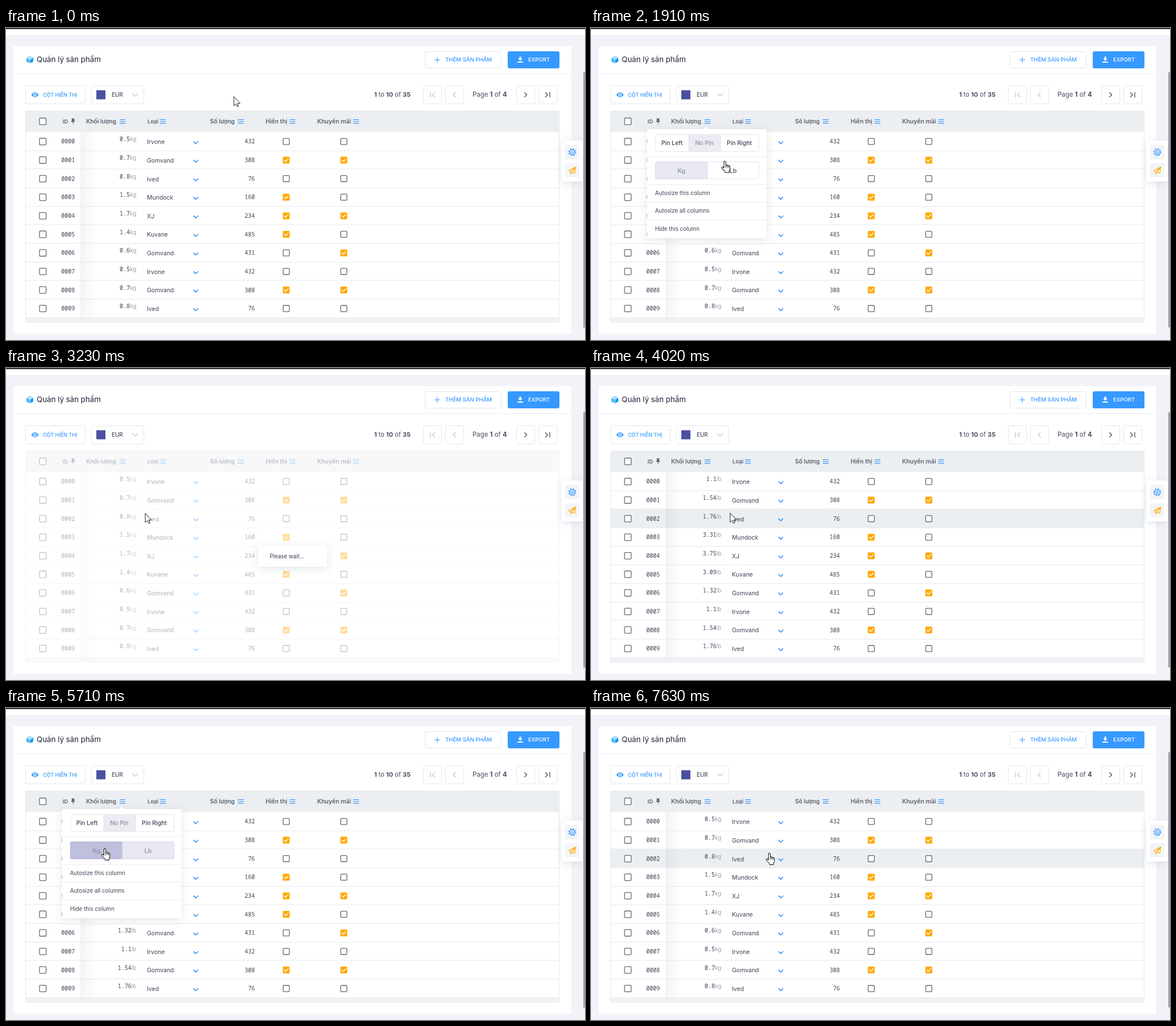
These frames come from a looping animation (1019x549 px, 8090 ms). An HTML page:

```html
<!DOCTYPE html>
<html lang="vi">
<head>
<meta charset="utf-8">
<title>Quản lý sản phẩm</title>
<style>
html, body { margin: 0; width: 100%; height: 100%; overflow: hidden; background: #f2f3f8; }
svg { display: block; width: 100vw; height: 100vh; }
text { font-family: Inter, "Open Sans", sans-serif; white-space: pre; }
.mono { font-family: "Noto Sans Mono", "DejaVu Sans Mono", monospace; }
</style>
</head>
<body>
<svg id="stage" viewBox="0 0 1019 549">
  <defs>
    <filter id="soft" x="-30%" y="-30%" width="160%" height="170%">
      <feDropShadow dx="0" dy="3" stdDeviation="7" flood-color="#525f80" flood-opacity=".17"/>
    </filter>
    <linearGradient id="edge">
      <stop offset="0" stop-color="#50566e" stop-opacity=".07"/>
      <stop offset="1" stop-color="#50566e" stop-opacity="0"/>
    </linearGradient>
  </defs>
</svg>
<script>
const LOOP = 8090;
const BLUE = '#3699ff', ORANGE = '#ffa800', INK = '#464e5f', DARK = '#3f4254';
const LINE = '#e4e6ee', GREY = '#8b8da0';
const TOP = 183, ROW = 32.65;
const svg = document.getElementById('stage');

function el(parent, tag, attrs, content) {
  const node = document.createElementNS('http://www.w3.org/2000/svg', tag);
  for (const key in attrs) node.setAttribute(key, attrs[key]);
  if (content !== undefined) node.textContent = content;
  parent.appendChild(node);
  return node;
}
const group = (parent, attrs) => el(parent, 'g', attrs || {});
const box = (parent, x, y, width, height, fill, more) =>
  el(parent, 'rect', { x, y, width, height, fill, ...more });
const path = (parent, d, stroke, width = 1.2, fill = 'none') =>
  el(parent, 'path', { d, stroke, 'stroke-width': width, fill,
    'stroke-linecap': 'round', 'stroke-linejoin': 'round' });
const label = (parent, x, y, content, size, fill = DARK, more) =>
  el(parent, 'text', { x, y, 'font-size': size, fill, ...more }, content);
const frame = (parent, x, y, w, h, fill = '#fff') =>
  box(parent, x + .5, y + .5, w - 1, h - 1, fill, { stroke: LINE, rx: 3 });
const MID = { 'text-anchor': 'middle' }, END = { 'text-anchor': 'end' };
const MEDIUM = { 'font-weight': 500 }, BOLD = { 'font-weight': 600 };

function checkbox(parent, cx, cy, size, on) {
  const x = cx - size / 2, y = cy - size / 2;
  if (!on) {
    box(parent, x, y, size, size, '#fff', { stroke: '#686868', 'stroke-width': 1.3, rx: 1.2 });
    return;
  }
  box(parent, x - .6, y - .6, size + 1.2, size + 1.2, ORANGE, { rx: 1.5 });
  path(parent, `M${cx - 3.3} ${cy}l2.4 2.5 4.4-4.8`, '#fff', 1.4);
}

function burger(parent, x) {
  for (const y of [161.3, 164.5, 167.7]) path(parent, `M${x} ${y}h9.5`, BLUE, 1.2);
}

function mixed(parent, x, y, size, parts) {
  const line = label(parent, x, y, '', size, INK);
  parts.forEach((part, i) =>
    el(line, 'tspan', { 'font-weight': i % 2 ? 400 : 700 }, part));
}

function drawPage() {
  box(svg, 0, 0, 1019, 549, '#f2f3f8');
  box(svg, 0, 0, 1019, 12, '#fff');
  box(svg, 0, 0, 1019, 2, '#2b2b33');
  box(svg, 13, 32, 982, 506, '#fff', { rx: 3 });
  box(svg, 13, 80, 982, 1, '#ebedf3');

  path(svg, 'M42 49l6 2.8-6 2.8-6-2.8z', 'none', 0, '#a5dcfb');
  path(svg, 'M36 52.6l5.6 2.7v6.6L36 59.2z', 'none', 0, '#41b9f4');
  path(svg, 'M48 52.6l-5.6 2.7v6.6l5.6-2.7z', 'none', 0, '#1c9df0');
  label(svg, 54, 59.5, 'Quản lý sản phẩm', 13.2, DARK, MEDIUM);

  frame(svg, 737, 41, 135, 30);
  path(svg, 'M754.5 56h9M759 51.5v9', BLUE, 1.1);
  label(svg, 773, 59.4, 'THÊM SẢN PHẨM', 9.6, BLUE, MEDIUM);
  box(svg, 883, 41, 91, 30, BLUE, { rx: 3 });
  path(svg, 'M903.5 50.5h3v3.5h2.3l-3.8 3.8-3.8-3.8h2.3z', 'none', 0, '#fff');
  path(svg, 'M900.8 60h8.4', '#fff', 1.8);
  label(svg, 919, 59.4, 'EXPORT', 9.5, '#fff', MEDIUM);

  frame(svg, 34, 101, 106, 33);
  path(svg, 'M44.5 117.5q6.5-8.6 13 0q-6.5 8.6-13 0z', 'none', 0, BLUE);
  el(svg, 'circle', { cx: 51, cy: 117.5, r: 2.2, fill: BLUE, stroke: '#fff', 'stroke-width': 1.3 });
  label(svg, 65, 120.8, 'CỘT HIỂN THỊ', 9, BLUE, MEDIUM);
  frame(svg, 150, 101, 93, 33);
  box(svg, 159, 109.5, 16, 16, '#4b509f');
  label(svg, 186, 121.2, 'EUR', 9.8, INK, MEDIUM);
  path(svg, 'M222.5 115.5l4.7 4.7 4.7-4.7', '#c3c6d2', 1.1);

  mixed(svg, 648, 121.3, 11, ['1', ' to ', '10', ' of ', '35']);
  mixed(svg, 821, 121.3, 11.4, ['', 'Page ', '1', ' of ', '4']);
  for (const x of [734, 773, 898, 937]) frame(svg, x, 101, 33, 33);
  path(svg, 'M747 113.2v8.6M754.5 113.7l-3.8 3.8 3.8 3.8', '#bfc2ce', 1.2);
  path(svg, 'M791 113.7l-3.8 3.8 3.8 3.8', '#bfc2ce', 1.2);
  path(svg, 'M912.8 113.7l3.8 3.8-3.8 3.8', INK, 1.3);
  path(svg, 'M949.5 113.7l3.8 3.8-3.8 3.8M957 113.2v8.6', INK, 1.3);
}

const PRODUCTS = [
  ['Irvone', .5, 432, 0, 0],
  ['Gomvand', .7, 308, 1, 1],
  ['Ived', .8, 76, 0, 0],
  ['Mundock', 1.5, 160, 1, 0],
  ['XJ', 1.7, 234, 1, 1],
  ['Kuvane', 1.4, 485, 1, 0],
  ['Gomvand', .6, 431, 0, 1]
];
const weights = [];
let hoverBar;

function drawTable() {
  box(svg, 34, 146, 940, 37, '#eceff1');
  hoverBar = box(svg, 34, TOP, 940, ROW, '#eceff1');
  box(svg, 34, 510, 940, 8, '#f1f2f7');
  box(svg, 131, TOP, 28, 327, 'url(#edge)');
  box(svg, 131, 510, 1, 8, '#e2e4ec');

  checkbox(svg, 64.8, 164.3, 11.6, false);
  const heads = [['ID', 99.5], ['Khối lượng', 141, 10.3], ['Loại', 249], ['Số lượng', 359, 10.3],
    ['Hiển thị', 457, 10.3], ['Khuyến mãi', 547.5, 10.5]];
  for (const [name, x, size = 9.6] of heads) label(svg, x, 167.8, name, size, '#5c6070', BOLD);
  path(svg, 'M115.5 159.8h5M116.6 160v3.2l-1.8 1.6h6.4l-1.8-1.6v-3.2M118 164.8v3.4', '#5c6070', 1.1, '#5c6070');
  for (const x of [200.3, 271.3, 408.3, 499.3, 611.5]) burger(svg, x);

  for (let i = 0; i < 10; i++) {
    const [name, kg, stock, shown, promo] = PRODUCTS[i % 7];
    const y = 199.8 + i * ROW;
    box(svg, 34, Math.round(TOP + (i + 1) * ROW) - .5, 940, 1, '#e6e8ee');
    checkbox(svg, 64.8, y, 11.6, false);
    label(svg, 97.3, y + 3.6, String(i).padStart(4, '0'), 10, DARK, { class: 'mono' });
    const cell = label(svg, 229.3, y - .4, '', 10, DARK, END);
    weights.push({ kg, value: el(cell, 'tspan', { class: 'mono' }), unit: el(cell, 'tspan', { fill: '#9da0ae' }) });
    label(svg, 248, y + 4.4, name, 10.5);
    path(svg, `M330.2 ${y + .2}l3.7 3.6 3.7-3.6`, BLUE, 1.7);
    label(svg, 438, y + 3.6, stock, 10, DARK, { class: 'mono', ...END });
    checkbox(svg, 493.2, y, 10.8, shown);
    checkbox(svg, 594.5, y, 10.8, promo);
  }
  box(svg, 34.5, 146, 939, 371.5, 'none', { stroke: '#e6e8ef', rx: 2 });
}

function drawSidebar() {
  box(svg, 1016, 78, 3, 449, '#9da1b4');
  box(svg, 978, 198, 37, 72, '#fff', { rx: 3, filter: 'url(#soft)' });
  for (const y of [206, 238]) box(svg, 984, y, 25, 25, '#f3f4f8', { rx: 3 });
  const gear = { cx: 996.5, cy: 218.5, fill: 'none', stroke: BLUE };
  el(svg, 'circle', { ...gear, r: 4.7, 'stroke-width': 1.2 });
  el(svg, 'circle', { ...gear, r: 6, 'stroke-width': 1.7, 'stroke-dasharray': '2.356 2.356' });
  el(svg, 'circle', { ...gear, r: 2, 'stroke-width': 1.1 });
  path(svg, 'M1002.8 244.5l-12.5 6.6 3.4 1.7 9.1-8.3-6.4 9.5 4.6 1.6zM993.7 252.8v4l2.7-2.8', ORANGE, 1.1);
}

function drawMenu() {
  const menu = group(svg);
  const panel = group(menu, { filter: 'url(#soft)' });
  box(panel, 98.5, 178, 210.5, 191.5, '#fff', { rx: 3 });
  path(panel, 'M198 178.5l5-5 5 5z', 'none', 0, '#fff');
  for (const y of [226, 275, 306, 337]) box(menu, 98.5, y, 210.5, 1, '#ebedf2');

  frame(menu, 113, 187, 183, 31);
  box(menu, 172, 188, 56, 29, '#ebebf2');
  for (const x of [171.5, 227.5]) box(menu, x, 187, 1, 31, LINE);
  label(menu, 142.5, 206, 'Pin Left', 10.4, DARK, { ...MID, ...MEDIUM });
  label(menu, 199.5, 206, 'No Pin', 10.4, GREY, { ...MID, ...MEDIUM });
  label(menu, 261, 206, 'Pin Right', 10.4, DARK, { ...MID, ...MEDIUM });

  frame(menu, 113, 235, 183, 31);
  const kgFill = box(menu, 113, 235, 92, 31, '#8f90c4', { rx: 2 });
  const lbFill = box(menu, 205, 235, 91, 31, '#8f90c4', { rx: 2 });
  box(menu, 204.5, 235, 1, 31, '#d9dae6');
  const kgText = label(menu, 159, 254.7, 'Kg', 10.8, DARK, { ...MID, ...MEDIUM });
  const lbText = label(menu, 250, 254.7, 'Lb', 10.8, DARK, { ...MID, ...MEDIUM });

  label(menu, 112.7, 293.8, 'Autosize this column', 9.9);
  label(menu, 112.7, 324.8, 'Autosize all columns', 9.9);
  label(menu, 112.7, 356.8, 'Hide this column', 9.9);
  return { menu, kgFill, lbFill, kgText, lbText };
}

drawPage();
drawTable();
const veil = box(svg, 34, 146, 940, 372, '#fff');
const wait = group(svg);
box(wait, 443.5, 313, 121.5, 36.5, '#fff', { rx: 2, filter: 'url(#soft)' });
label(wait, 464, 334.8, 'Please wait...', 9.8);
drawSidebar();
const ui = drawMenu();
const cursor = group(svg);
const arrow = path(cursor, 'M0 0V16L3.8 12.4 6 17.6 8.4 16.6 6.2 11.6H10.6Z', '#222', 1, '#fff');
const hand = path(cursor, 'M-1.6 2a1.6 1.6 0 0 1 3.2 0V7.3a1.5 1.5 0 0 1 2.6.5a1.5 1.5 0 0 1 2.4.8a1.4 1.4 0 0 1 2.2 1.2V14q0 3-1.6 4.6V20.6H.4V19L-5.1 13q-1.2-1.9.3-2.5t3.2 1.9zM1.6 7.5V11M4.2 8V11M6.6 8.8V11.4', '#222', 1.1, '#fff');

// Keys are [time, value...]; values between keys ease in and out.
function track(keys, t) {
  const last = keys[keys.length - 1];
  if (t <= keys[0][0]) return keys[0].slice(1);
  if (t >= last[0]) return last.slice(1);
  const i = keys.findIndex(key => key[0] > t);
  const a = keys[i - 1], b = keys[i];
  const p = (t - a[0]) / (b[0] - a[0]), e = p * p * (3 - 2 * p);
  return a.slice(1).map((v, n) => v + (b[n + 1] - v) * e);
}

const MOVES = [
  [300, 401, 121], [640, 176, 174], [840, 195, 167], [1060, 195, 167], [1140, 207, 167],
  [1580, 207, 167], [2070, 245, 256], [4000, 245, 256], [4540, 207, 167],
  [4860, 207, 167], [5330, 174, 247], [6250, 174, 247], [6850, 314, 255]
];
const MENU = [[1300, 0], [1480, 1], [2400, 1], [2650, 0], [4610, 0], [4800, 1], [5930, 1], [6150, 0]];
const VEIL = [[2150, 0], [2350, .6], [3400, .6], [3620, 0], [5760, 0], [5960, .6], [6780, .6], [7020, 0]];
const WAIT = [[2480, 0], [2750, 1], [3320, 1], [3520, 0], [6080, 0], [6330, 1], [6680, 1], [6900, 0]];
const KG = [[0, .2], [2150, .2], [2300, .29], [2650, .29], [2700, 0], [5300, 0], [5650, .57], [6150, .57]];
const LB = [[1900, 0], [2070, .24], [2650, .24], [2700, .2], [6150, .2]];
const POINTING = [[1110, 2680], [4500, 6180], [7630, LOOP]];

function render(t) {
  const [x, y] = track(MOVES, t);
  const [menu] = track(MENU, t), [dim] = track(VEIL, t), [busy] = track(WAIT, t);
  const show = (node, opacity) => {
    node.setAttribute('opacity', opacity);
    node.setAttribute('visibility', opacity > 0 ? 'visible' : 'hidden');
  };
  show(ui.menu, menu);
  show(veil, dim);
  show(wait, busy);
  show(ui.kgFill, menu ? track(KG, t)[0] : 0);
  show(ui.lbFill, menu ? track(LB, t)[0] : 0);

  const lbChosen = t >= 2180 && t < 5650;
  ui.kgText.setAttribute('fill', lbChosen ? DARK : GREY);
  ui.lbText.setAttribute('fill', lbChosen || t >= 5650 ? GREY : DARK);

  const pounds = t >= 3360 && t < 6650;
  for (const w of weights) {
    w.value.textContent = pounds ? +(w.kg * 2.20462).toFixed(2) : w.kg;
    w.unit.textContent = pounds ? 'lb' : 'kg';
  }

  const row = Math.floor((y - TOP) / ROW);
  show(hoverBar, row >= 0 && !menu && dim < .1 ? 1 : 0);
  hoverBar.setAttribute('y', TOP + Math.max(row, 0) * ROW);

  const pointing = POINTING.some(([from, to]) => t >= from && t < to);
  show(hand, pointing ? 1 : 0);
  show(arrow, pointing ? 0 : 1);
  cursor.setAttribute('transform', `translate(${x.toFixed(2)} ${y.toFixed(2)})`);
}

const start = performance.now();
function tick() {
  render((performance.now() - start) % LOOP);
  requestAnimationFrame(tick);
}
tick();
</script>
</body>
</html>
```
